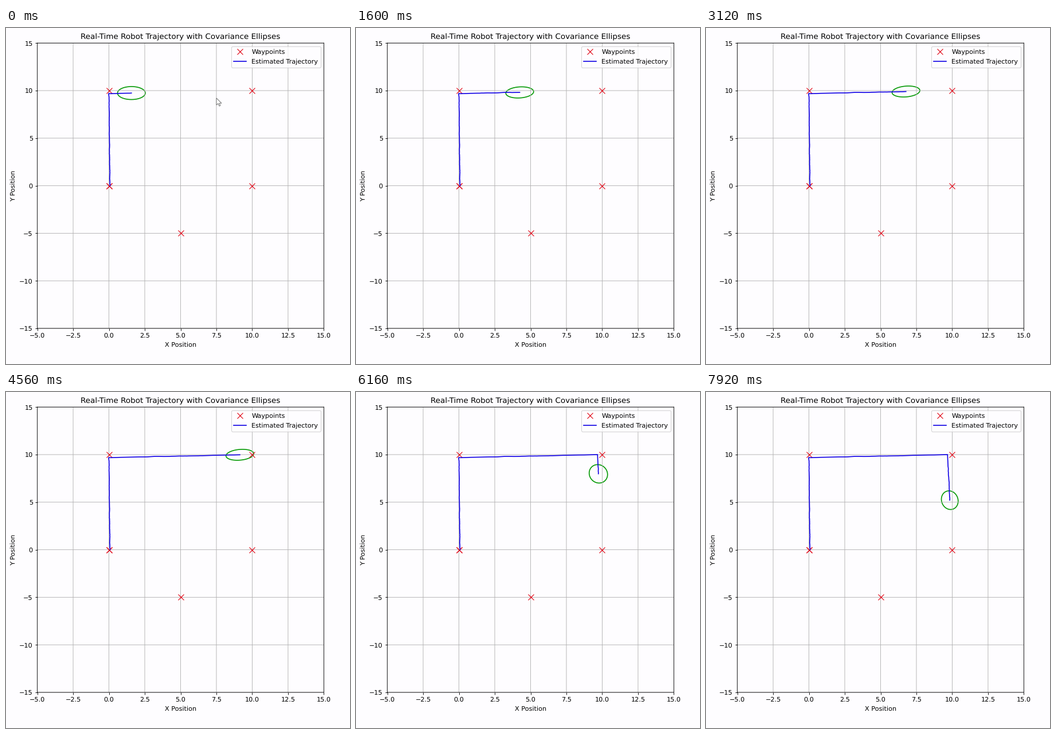
Recreate the animation shown at these times as a matplotlib script. Size 600 px wide and 585 px high, loop 8 s.

```python
import numpy as np
import matplotlib.pyplot as plt
from matplotlib.animation import FuncAnimation
from matplotlib.patches import Polygon
from matplotlib.transforms import IdentityTransform

WIDTH, HEIGHT, DPI = 600, 585, 80
FRAMES, INTERVAL = 100, 80
PAPER, RED, BLUE, GREEN = "#fefdff", "#e0000f", "#1000e4", "#069a06"

plt.rcParams.update({
    "font.family": "DejaVu Sans",
    "font.size": 10.08,
    "text.hinting": "none",
    "figure.facecolor": PAPER,
    "axes.facecolor": PAPER,
    "axes.labelpad": 4.6,
})

# Frames at which the robot starts, turns twice and is cut off, and where.
START, TURN_1, TURN_2, END = -90, -12, 61, 99
CORNERS_X = (0.07, 0.0, 9.67, 9.83)
CORNERS_Y = (0.0, 9.68, 10.0, 5.22)
TIMES = np.arange(START, END + 1)

rng = np.random.default_rng(4)


def drive(corners):
    """Constant speed between corners, with a slight estimation wobble."""
    wobble = np.convolve(rng.normal(0, 0.02, TIMES.size), np.ones(5) / 5, "same")
    return np.interp(TIMES, (START, TURN_1, TURN_2, END), corners) + wobble


XS, YS = drive(CORNERS_X), drive(CORNERS_Y)
ANGLES = np.linspace(0, 2 * np.pi, 121)
ARROW = np.array([(0, 0), (0, 12), (3, 9.5), (5, 14), (7, 13), (5, 9), (9, 9)])


def relax(first, last, elapsed, tau):
    return last + (first - last) * np.exp(-elapsed / tau)


def covariance(frame):
    """Width, height and correlation; they settle anew after each turn."""
    if frame < TURN_2:
        since = frame - TURN_1
        return 1.94, relax(1.96, 1.15, since, 9), relax(-0.2, 0.2, since, 17)
    since = frame - TURN_2
    return (relax(1.94, 1.16, since, 8.6), relax(1.15, 1.96, since, 4.4),
            relax(0.2, -0.1, since, 6))


def ellipse_points(frame, x, y):
    width, height, rho = covariance(frame)
    u, v = np.cos(ANGLES), np.sin(ANGLES)
    return np.column_stack((x + width / 2 * u,
                            y + height / 2 * (rho * u + np.sqrt(1 - rho**2) * v)))


def cursor_points(frame):
    progress = np.clip((frame - 1) / 4, 0, 1)
    tip = np.array((367, 122)) + progress * np.array((218, -99))
    return (ARROW + tip) * (1, -1) + (0, HEIGHT)


fig = plt.figure(figsize=(WIDTH / DPI, HEIGHT / DPI), dpi=DPI)
ax = fig.add_axes((54.6 / WIDTH, 1 - 523 / HEIGHT, 499.8 / WIDTH, 496.8 / HEIGHT))
ax.set(xlim=(-5, 15), ylim=(-15, 15), xlabel="X Position", ylabel="Y Position",
       title="Real-Time Robot Trajectory with Covariance Ellipses")
ax.grid(True)
ax.plot([0, 0, 10, 10, 5, 0], [0, 10, 10, 0, -5, 0], "x", color=RED,
        markersize=9, label="Waypoints")
line, = ax.plot([], [], color=BLUE, lw=1.5, label="Estimated Trajectory")
ellipse = ax.add_patch(Polygon([(0, 0)], fill=False, edgecolor=GREEN, lw=1.5))
ax.legend(loc="upper right", labelspacing=0.58)
cursor = fig.add_artist(Polygon(cursor_points(0), transform=IdentityTransform(),
                                facecolor="white", edgecolor="#666666",
                                lw=0.8, zorder=10))

# Keep thin lines at their exact subpixel positions.
for artist in (*ax.spines.values(), *ax.get_xgridlines(), *ax.get_ygridlines()):
    artist.set_snap(False)


def update(frame):
    driven = TIMES <= frame
    x, y = XS[driven], YS[driven]
    line.set_data(x, y)
    ellipse.set_xy(ellipse_points(frame, x[-1], y[-1]))
    cursor.set_xy(cursor_points(frame))
    cursor.set_visible(frame < 6)
    return line, ellipse, cursor


animation = FuncAnimation(fig, update, frames=FRAMES, interval=INTERVAL,
                          init_func=lambda: update(0), repeat=True,
                          repeat_delay=0)
plt.show()
```
